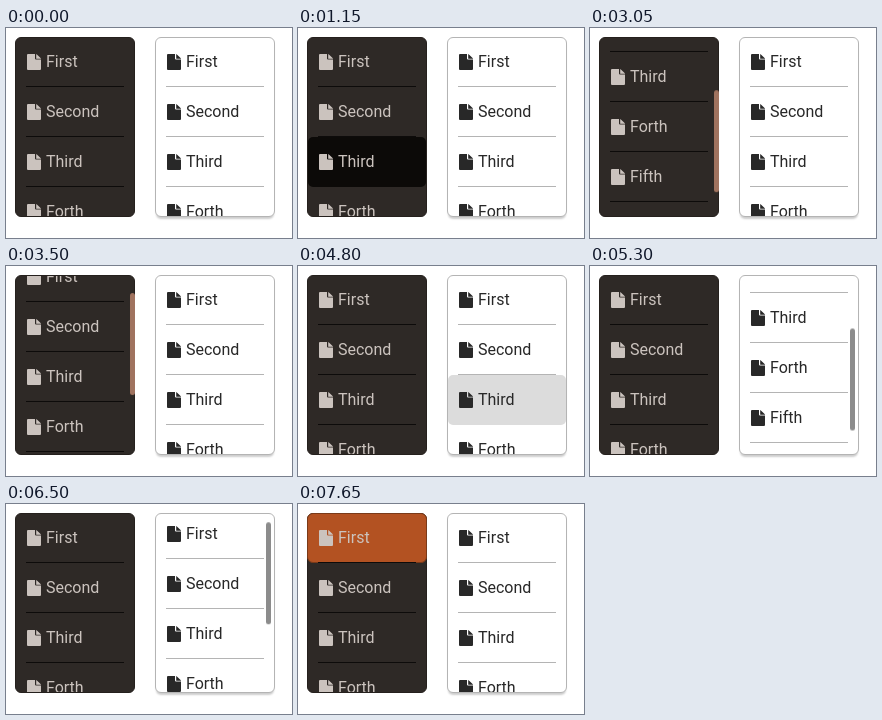
Recreate the animation shown at these times as an HTML page. Size 286 px wide and 210 px high, loop 8000 ms.

```html
<!DOCTYPE html>
<html lang="en">
<head>
<meta charset="utf-8">
<title>Scrolling lists</title>
<style>
@property --scroll { syntax: "<integer>"; inherits: true; initial-value: 0; }

html, body { margin: 0; width: 100%; height: 100%; overflow: hidden; background: #fff; }
body { position: relative; font: 16px/50px Roboto, sans-serif; }

.panel {
  position: absolute; top: 9px; width: 120px; height: 180px;
  box-sizing: border-box; border: 1px solid var(--edge); border-radius: 6px;
  background: var(--face); color: var(--ink);
  animation: 8s infinite;
}
.dark {
  left: 9px;
  --face: #2e2926; --edge: #25201d; --ink: #cbc3be; --line: #0d0b0a;
  --press: #0c0a08; --thumb: #a0735f;
  animation-name: scroll-dark;
}
.light {
  left: 149px; box-shadow: 0 3px 2px -1px #0003;
  --face: #fff; --edge: #b4b4b4; --ink: #282828; --line: #b4b4b4;
  --press: #dcdcdc; --thumb: #8c8c8c;
  animation-name: scroll-light;
}

.view { position: absolute; inset: 0; overflow: hidden; border-radius: 5px; }
.list { position: absolute; inset: -1px 0 auto; transform: translateY(calc(var(--scroll) * -1px)); }
.row { position: relative; height: 50px; padding-left: 30px; white-space: nowrap; }
.row::after {
  content: ""; position: absolute; left: 10px; top: 49px;
  width: 98px; height: 1px; background: var(--line);
}
.row svg { position: absolute; left: 11px; top: 17px; fill: currentColor; }
.row span { position: relative; }

.press {
  position: absolute; inset: 0; z-index: 1; border-radius: 5px;
  background: var(--press); opacity: 0; animation: 8s step-end infinite;
}
.row svg, .row span { z-index: 2; }
.dark .press { animation-name: press-dark; }
.light .press { animation-name: press-light; }

.thumb {
  position: absolute; width: 5px; height: 102px; border-radius: 2.5px;
  background: var(--thumb); opacity: 0;
  transform: translateY(calc(var(--scroll) * .567px));
  animation: 8s step-end infinite;
}
.dark .thumb { left: 114px; top: 4px; animation-name: thumb-dark; }
.light .thumb { left: 110px; top: 6px; animation-name: thumb-light; }

.select {
  position: absolute; left: -1px; top: -1px; width: 120px; height: 50px;
  box-sizing: border-box; border: 1px solid #7a3a19; border-radius: 6px;
  background: #b35222; opacity: 0; animation: select 8s step-end infinite;
}

@keyframes scroll-dark {
  0% { --scroll: 0; animation-timing-function: step-end; }
  16.25% { --scroll: 14; }
  17.5% { --scroll: 14; animation-timing-function: cubic-bezier(.333, .45, .667, .8); }
  30% { --scroll: 92; }
  37.5% { --scroll: 92; animation-timing-function: cubic-bezier(.333, .37, .667, .72); }
  46.25%, 100% { --scroll: 0; }
}
@keyframes scroll-light {
  0% { --scroll: 0; animation-timing-function: step-end; }
  61.25% { --scroll: 14; }
  62.5% { --scroll: 14; animation-timing-function: cubic-bezier(.333, .4, .667, .85); }
  69.375% { --scroll: 120; }
  74.375% { --scroll: 120; animation-timing-function: cubic-bezier(.333, .12, .667, .9); }
  81.875%, 100% { --scroll: 0; }
}
@keyframes press-dark { 14.375% { opacity: 1; } 16.25% { opacity: 0; } }
@keyframes press-light { 60% { opacity: 1; } 61.25% { opacity: 0; } }
@keyframes thumb-dark { 18.125% { opacity: 1; } 50.625% { opacity: 0; } }
@keyframes thumb-light { 63.125% { opacity: 1; } 87.5% { opacity: 0; } }
@keyframes select { 95% { opacity: .5; } 95.625%, 100% { opacity: 1; } }
</style>
</head>
<body>
<script>
const names = ["First", "Second", "Third", "Forth", "Fifth", "Sixth"];

const icon = `<svg width="14" height="16" viewBox="0 0 14 16">
  <path d="M1 0h7v4.6q0 1 1 1h5v9.4q0 1-1 1h-12q-1 0-1-1v-14q0-1 1-1z"/>
  <path d="M9.2 0q.4.1.7.4l3.7 3.6q.3.3.4.7h-4.8z"/>
</svg>`;

const row = name => `<div class="row">
  ${name === "Third" ? '<div class="press"></div>' : ""}${icon}<span>${name}</span>
</div>`;

const panel = theme => `<div class="panel ${theme}">
  ${theme === "dark" ? '<div class="select"></div>' : ""}
  <div class="view"><div class="list">${names.map(row).join("")}</div></div>
  <div class="thumb"></div>
</div>`;

document.body.innerHTML = panel("dark") + panel("light");
</script>
</body>
</html>
```
